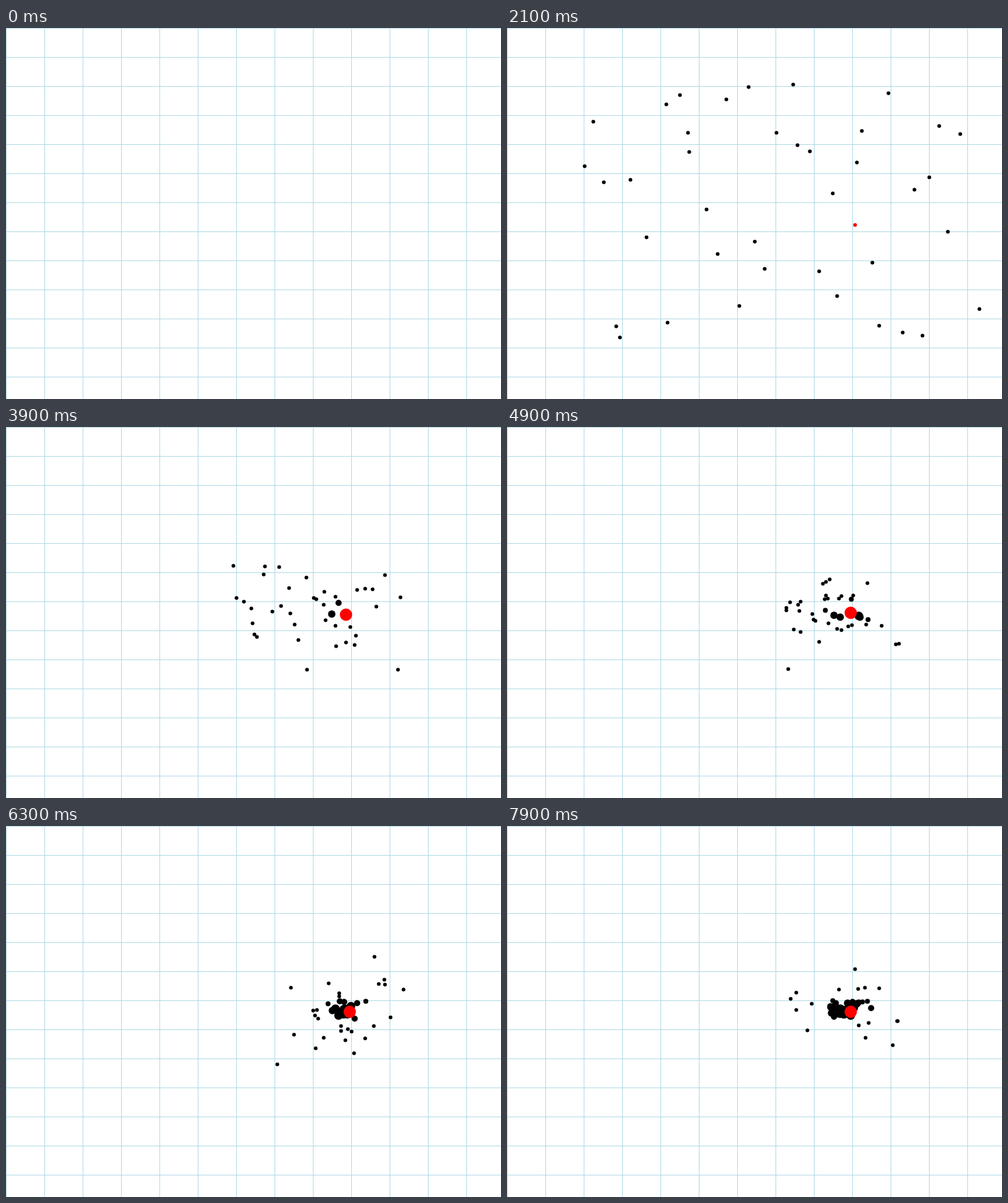
Recreate the animation shown at these times as an HTML page with a canvas. Size 800 px wide and 600 px high, loop 8 s.

```html
<!DOCTYPE html>
<html lang="en">
<head>
<meta charset="utf-8">
<title>Particle swarm</title>
<style>
  html, body { margin: 0; width: 100%; height: 100%; overflow: hidden; background: #fff; }
  canvas { display: block; }
</style>
</head>
<body>
<canvas id="stage" width="800" height="600"></canvas>
<script>
const ctx = document.getElementById('stage').getContext('2d');
const LOOP = 8000, STEP = 200, APPEAR = 100, MOVE = 2100;
const COUNT = 39;
const GOAL = { x: 548, y: 300 };

// Best position so far, from each move on.
const best = [
  { move: 0, x: 562, y: 318, r: 3 },
  { move: 4, x: 518, y: 295, r: 5 },
  { move: 7, x: 549, y: 303, r: 10 },
  { move: 13, x: 555, y: 300, r: 10 }
];

let seed = 29;
function rand() {
  seed = (seed * 16807) % 2147483647;
  return seed / 2147483647;
}

// One axis of a particle: its starting offset and how it circles the goal.
const axis = (home, swing) => ({ home, swing, rate: 0.9 + rand(), phase: rand() * 2 * Math.PI });

const swarm = Array.from({ length: COUNT }, (_, i) => {
  const reach = rand();
  return {
    x: axis(26 + 771 * i / (COUNT - 1) - GOAL.x, 105 * reach),
    y: axis(20 + 577 * rand() - GOAL.y, 90 * reach)
  };
});

// The pull shrinks the starting offset while the circling takes over.
function offset(a, move, decay) {
  const pull = move ? Math.pow(decay, move + 1) : 1;
  return a.home * pull + a.swing * (1 - pull) * Math.sin(a.rate * move + a.phase);
}

// Better positions make larger dots.
function size(x, y) {
  const dy = y - 300;
  const cost = Math.hypot((x - 552) / 7, dy / (dy > 0 ? 2.5 : 3.5));
  return Math.max(3, Math.round(10 - cost));
}

function dot(x, y, r, color) {
  ctx.fillStyle = color;
  ctx.beginPath();
  ctx.arc(Math.round(x) + 0.5, Math.round(y) + 0.5, r, 0, Math.PI * 2);
  ctx.fill();
}

function drawGrid() {
  ctx.fillStyle = '#fff';
  ctx.fillRect(0, 0, 800, 600);
  ctx.fillStyle = 'lightblue';
  for (let x = 0; x < 800; x += 62) ctx.fillRect(x, 0, 1, 600);
  for (let y = 0; y < 600; y += 47) ctx.fillRect(0, y, 800, 1);
}

function draw(t) {
  drawGrid();
  if (t < APPEAR) return;
  const move = t < MOVE ? 0 : 1 + Math.floor((t - MOVE) / STEP);
  for (const p of swarm) {
    const x = GOAL.x + offset(p.x, move, 0.9);
    const y = GOAL.y + offset(p.y, move, 0.85);
    dot(x, y, size(x, y), '#000');
  }
  const { x, y, r } = best.filter(b => b.move <= move).pop();
  dot(x, y, r, '#f00');
}

const start = performance.now();
function tick() {
  draw((performance.now() - start) % LOOP);
  requestAnimationFrame(tick);
}
tick();
</script>
</body>
</html>
```
